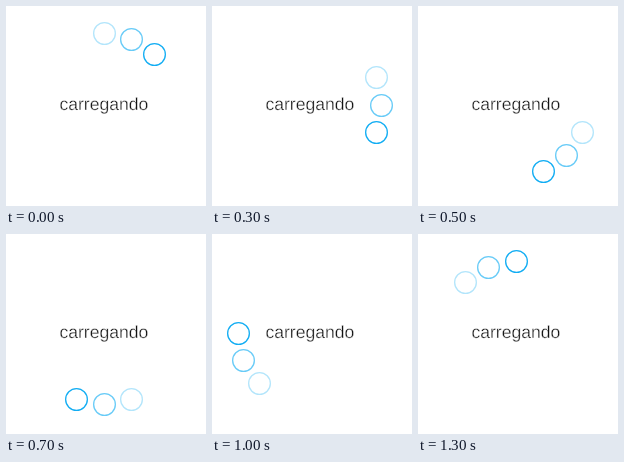
An HTML page for the animation above (1400 ms loop, 200 by 200 pixels).

```html
<!DOCTYPE html>
<html lang="pt">
<head>
<meta charset="utf-8">
<title>carregando</title>
<style>
html, body { margin: 0; width: 100%; height: 100%; overflow: hidden; background: #fff; }
svg { display: block; width: 100vw; height: 100vh; }
/* the white outline thins the letters to a light weight */
text {
  font: 17.6px "Liberation Sans", Arial, sans-serif;
  text-rendering: geometricPrecision;
  fill: #111; stroke: #fff; stroke-width: .4;
}
circle { fill: none; stroke: #12adf3; stroke-width: 1.3; }
</style>
</head>
<body>
<svg viewBox="0 0 200 200">
  <text x="53.4" y="104">carregando</text>
  <circle r="10.85" opacity=".32"/>
  <circle r="10.85" opacity=".64"/>
  <circle r="10.85"/>
</svg>
<script>
const STEP = 100, STEPS = 14, SLOTS = 16, RADIUS = 71.6;
const rings = document.querySelectorAll("circle");
const snap = v => Math.floor(v) + 0.5;

function draw(now) {
  const step = Math.floor(now / STEP) % STEPS;
  // the lead ring skips slots 15 and 1 on its way past the top
  const lead = step === STEPS - 1 ? SLOTS : step + 2;
  rings.forEach((ring, i) => {
    const angle = (lead - 2 + i) / SLOTS * 2 * Math.PI;
    ring.setAttribute("cx", snap(98.1 + RADIUS * Math.sin(angle)));
    ring.setAttribute("cy", snap(99.3 - RADIUS * Math.cos(angle)));
  });
}

const start = performance.now();
function loop() {
  draw(performance.now() - start);
  requestAnimationFrame(loop);
}
loop();
</script>
</body>
</html>
```
